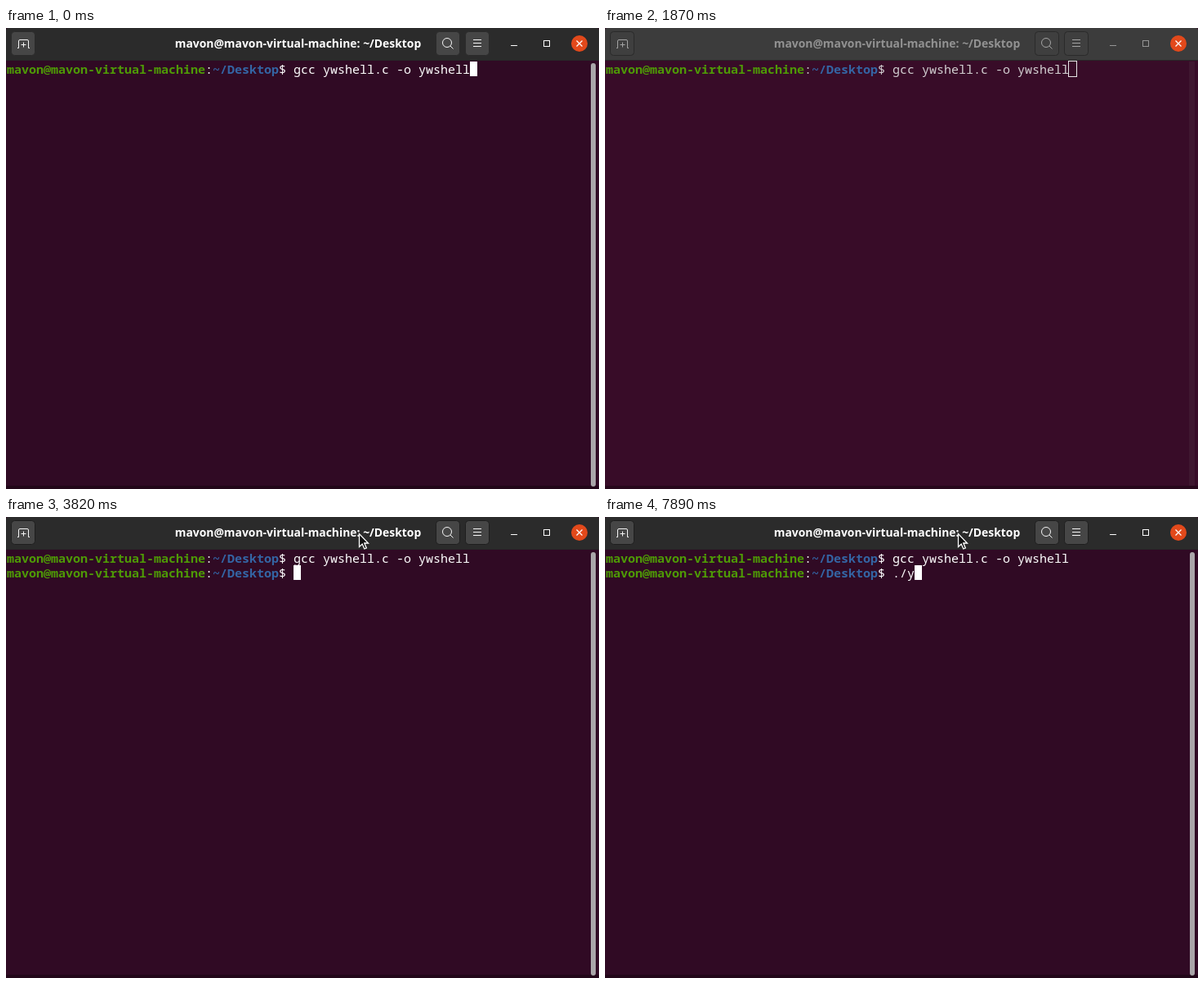
Recreate the animation shown at these times as an HTML page. Size 726 by 564 pixels, loop 8 s.

```html
<!DOCTYPE html>
<html lang="en">
<head>
<meta charset="utf-8">
<title>Terminal</title>
<style>
  html, body { margin: 0; width: 100%; height: 100%; overflow: hidden; background: #300a24; }
  svg { display: block; width: 726px; height: 564px; }
  .line { font: 15px "Noto Sans Mono", monospace; white-space: pre; }
  .user { fill: #4e9a06; font-weight: 700; }
  .path { fill: #3465a4; font-weight: 700; }
  #title { font: 700 13.9px "Noto Sans", sans-serif; text-anchor: middle; }
  #icons path, #icons circle, #marks path, #marks rect { fill: none; }
</style>
</head>
<body>
<svg viewBox="0 0 726 564">
  <rect id="screen" width="726" height="564"/>
  <rect y="560" width="726" height="4" fill="#000" opacity=".3"/>

  <path id="head" d="M0 39V3Q0 0 3 0H723Q726 0 726 3V39Z"/>
  <rect y="39" width="726" height="1" fill="#282828"/>
  <text id="title" x="357.5" y="24">mavon@mavon-virtual-machine: ~/Desktop</text>
  <g id="buttons">
    <rect x="6.5" y="4.5" width="29" height="29" rx="4"/>
    <rect x="526.5" y="4.5" width="29" height="29" rx="4"/>
    <rect x="562.5" y="4.5" width="29" height="29" rx="4"/>
  </g>
  <g id="icons">
    <path d="M14 24.5H15.5V16Q15.5 14.5 17 14.5H26Q27.5 14.5 27.5 16V24.5H29M21.5 17.5V23.5M18.5 20.5H24.5"/>
    <circle cx="540" cy="18" r="5.5"/>
    <path d="M544 22L547.5 25.5M572 14.5H582M572 18.5H582M572 22.5H582"/>
  </g>
  <g id="marks">
    <path d="M618 21.5H626"/>
    <rect x="658.5" y="15.5" width="7" height="7"/>
  </g>
  <circle cx="702" cy="19" r="10" fill="#e2491b"/>
  <path d="M698.5 15.5L705.5 22.5M705.5 15.5L698.5 22.5" stroke="#fff" stroke-width="1.3"/>

  <rect id="trough" x="715" y="41" width="7" height="519" fill="#3f1730"/>
  <rect id="thumb" x="716" y="43" width="6" height="518" rx="3" fill="#aaa6a9"/>

  <g id="text">
    <text class="line" x="1" y="56"><tspan class="user">mavon@mavon-virtual-machine</tspan>:<tspan class="path">~/Desktop</tspan>$ gcc ywshell.c -o ywshell</text>
    <text class="line" id="second" x="1" y="74"><tspan class="user">mavon@mavon-virtual-machine</tspan>:<tspan class="path">~/Desktop</tspan>$ <tspan id="typed"></tspan></text>
  </g>
  <rect id="caret" width="9" height="18"/>

  <g id="beam" fill="none">
    <path d="M-3 -7.5H3M0 -7.5V7.5M-3 7.5H3" stroke="#fff" stroke-width="2.6"/>
    <path d="M-3 -7.5H3M0 -7.5V7.5M-3 7.5H3" stroke="#111"/>
  </g>
  <path id="arrow" d="M.5 .5V16.5L4.2 13L6.8 19L9.3 17.9L6.8 12H11.5Z" fill="#111" stroke="#fff" stroke-width="1.3"/>
</svg>
<script>
const LOOP = 8000;
const $ = id => document.getElementById(id);

// Window fade: time, header dimness, button dimness
const fades = [[0, 0, 0], [1750, .5, .4], [1870, 1, .85], [2020, 1, .95], [2170, 1, 1],
  [2470, .7, 1], [2590, .3, .9], [2710, 0, .75], [2830, 0, 0]];
// Pointer: time, x, y, shape
const pointer = [[0], [810, 703, 45, "beam"], [930, 636, 54, "beam"], [1080, 556, 55.5, "beam"],
  [1230, 721, 77, "beam"], [1350], [2020, 600, 63, "beam"], [2170, 447, 126, "beam"],
  [2320, 432, 69, "beam"], [2470, 432, 20, "arrow"]];
// Caret: time, column, row, visible
const carets = [[0, 63, 0, 1], [3260, 63, 0, 0], [3820, 39, 1, 1], [4380, 39, 1, 0], [4970, 39, 1, 1],
  [5560, 39, 1, 0], [6150, 39, 1, 1], [6400, 40, 1, 1], [6650, 41, 1, 1], [7210, 41, 1, 0],
  [7740, 41, 1, 1], [7890, 42, 1, 1]];

const at = (steps, t) => steps.findLast(s => s[0] <= t);
const grey = (a, b, k) => {
  const v = Math.round(a + (b - a) * k);
  return `rgb(${v}, ${v}, ${v})`;
};
const set = (id, attrs) => {
  for (const name in attrs) $(id).setAttribute(name, attrs[name]);
};
const show = (id, on) => set(id, { visibility: on ? "visible" : "hidden" });

function draw(t) {
  const [, head, button] = at(fades, t);
  const blurred = t >= 1750 && t < 2470;
  const outlined = blurred || t >= 2830;
  set("screen", { fill: blurred ? "#380c28" : "#300a24" });
  set("head", { fill: grey(43, 60, head) });
  set("title", { fill: grey(255, 146, head) });
  set("buttons", {
    fill: grey(70, 62, button),
    stroke: outlined ? grey(30, 42, head) : grey(43, 60, head)
  });
  set("icons", { stroke: grey(245, 150, button) });
  set("marks", { stroke: grey(255, 150, head) });
  set("thumb", { opacity: 1 - head });
  show("trough", blurred);
  set("text", { fill: blurred ? "#d3d0d2" : "#fff" });

  const [, col, row, on] = at(carets, t);
  const grow = blurred ? .5 : 0;
  set("caret", {
    x: 1 + col * 9 - grow, y: 41 + row * 18 - grow,
    width: 9 + 2 * grow, height: 18 + 2 * grow,
    fill: blurred ? "none" : "#fff", stroke: blurred ? "#e8e4e7" : "none"
  });
  show("caret", on);
  show("second", row);
  $("typed").textContent = "./y".slice(0, row ? col - 39 : 0);

  const [, x, y, shape] = at(pointer, t);
  for (const id of ["beam", "arrow"]) {
    show(id, id === shape);
    if (id === shape) set(id, { transform: `translate(${x} ${y})` });
  }
}

const start = performance.now();
function tick() {
  draw((performance.now() - start) % LOOP);
  requestAnimationFrame(tick);
}
tick();
</script>
</body>
</html>
```
